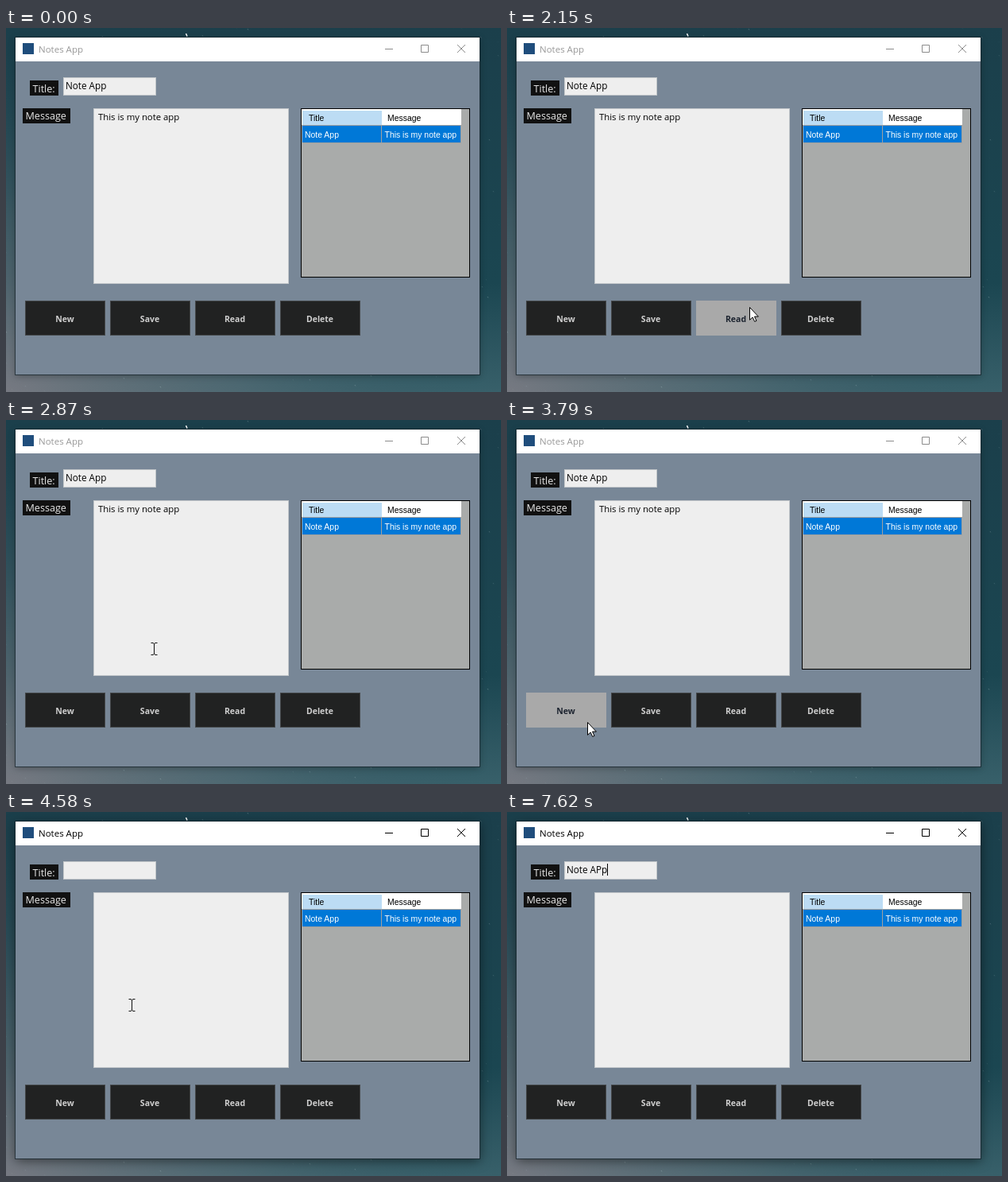
An HTML page that plays this animation: 623 px wide and 458 px high, repeating every 8000 ms.

```html
<!DOCTYPE html>
<html lang="en">
<head>
<meta charset="utf-8">
<title>Notes App</title>
<style>
html, body { margin: 0; width: 100%; height: 100%; overflow: hidden; background: #1b404c; }
svg { display: block; width: 100vw; height: 100vh; }
text { font-family: "Open Sans", "Noto Sans", sans-serif; font-size: 11.7px; white-space: pre; }
.label { font-size: 12.6px; fill: #e8e8e8; }
.field { fill: #eee; stroke: #c3c7ca; }
.grid text { font: 10.45px "Liberation Sans", Arial, sans-serif; }
.btn rect { fill: #212222; stroke: #444749; }
.btn text { font-size: 10.5px; font-weight: 700; fill: #cfcfcf; text-anchor: middle; }
.btn.hover rect { fill: #a9a9a9; stroke: #a9a9a9; }
.btn.hover text { fill: #1d2430; }
#frame { filter: drop-shadow(0 2px 4px rgba(0,0,0,.3)); }
.active #frame { filter: drop-shadow(0 3px 7px rgba(0,0,0,.5)); }
#caption { font-size: 11.5px; fill: #999; }
#message { font-size: 11.35px; }
#controls { fill: none; stroke: #8c8c8c; }
.active #caption { fill: #000; }
.active #controls { stroke: #000; }
</style>
</head>
<body>
<svg id="stage" viewBox="0 0 623 458">
  <defs>
    <linearGradient id="sky" x2="0" y2="1">
      <stop offset="0" stop-color="#1b3f4b"/>
      <stop offset=".7" stop-color="#1b4651"/>
      <stop offset="1" stop-color="#38606a"/>
    </linearGradient>
    <radialGradient id="haze" cx="0" cy="1" r=".95">
      <stop offset="0" stop-color="#7d7c84" stop-opacity=".9"/>
      <stop offset=".5" stop-color="#66727b" stop-opacity=".45"/>
      <stop offset="1" stop-color="#36545f" stop-opacity="0"/>
    </radialGradient>
  </defs>
  <rect width="623" height="458" fill="url(#sky)"/>
  <rect width="623" height="458" fill="url(#haze)"/>
  <g id="stars" stroke="#b9d0d4"></g>
  <path d="M226.5 7l1.5 3.5" stroke="#fff" stroke-width="1.5"/>

  <rect id="frame" x="12" y="12" width="584" height="424" fill="#788797"/>
  <rect x="11.5" y="11.5" width="585" height="425" fill="none" stroke="#14232a" stroke-opacity=".7"/>
  <rect x="12" y="12" width="584" height="30" fill="#fff"/>
  <rect x="21" y="19" width="14" height="14" fill="#1f4d7c"/>
  <text id="caption" x="41" y="31">Notes App</text>
  <path id="controls" d="M477 26.5h10M522.5 21.5h9v9h-9zM568 21l10 10M578 21l-10 10"/>

  <path d="M30 66h36v19H30zM21 101h60v19H21z" fill="#111"/>
  <text class="label" x="33.5" y="80.5">Title:</text>
  <text class="label" x="24.5" y="115">Message</text>
  <rect class="field" x="72.5" y="62.5" width="116" height="22"/>
  <rect class="field" x="110.5" y="101.5" width="245" height="220"/>
  <text id="title" x="75" y="77"></text>
  <text id="message" x="116" y="116"></text>
  <path id="caret" d="M.5 65v15" stroke="#000"/>

  <g class="grid">
    <rect x="371.5" y="101.5" width="212" height="212" fill="#a9abaa" stroke="#000"/>
    <rect x="372" y="102" width="201" height="20" fill="#fff"/>
    <rect x="373" y="104" width="100" height="18" fill="#bcdcf4"/>
    <rect x="373" y="123" width="199" height="21" fill="#0078d7"/>
    <path d="M373 122.5h200M472.5 123v21M572.5 123v21M373 144.5h200" stroke="#a0a0a0"/>
    <text x="381" y="117">Title</text>
    <text x="480" y="117">Message</text>
    <text x="376" y="138" fill="#fff">Note App</text>
    <text x="476.5" y="138" fill="#fff">This is my note app</text>
  </g>
  <g id="buttons"></g>

  <path id="arrow" d="M.5 .5V16.3L4.1 12.9L6.7 18.4L9 17.4L6.5 12.1H11.4Z" fill="#fff" stroke="#000"/>
  <path id="beam" d="M-3.5-7.5H-1L.5-6.5L2-7.5H4.5M.5-6.5V6.5M-3.5 7.5H-1L.5 6.5L2 7.5H4.5" fill="none" stroke="#111"/>
</svg>
<script>
const LOOP = 8000, ENTER = 440, STEP = 65.7;
const CLICK = 4190, CLEAR = 4250, FOCUS = 5040, BLINK = 530;
const TYPED = "Note APp", TYPE = 6760, KEY = 122.8;
const $ = id => document.getElementById(id);

// pointer turning points: time, x, y
const path = [
  [ENTER, 182, 418], [700, 198, 410], [970, 198, 410], [1230, 198, 368],
  [1290, 190, 362], [1690, 190, 362], [1820, 214, 395], [2150, 305, 351],
  [2610, 346, 131], [2870, 186, 288], [3130, 128, 377], [3340, 101, 332],
  [3790, 101, 380], [CLEAR, 101, 380], [4320, 142, 266], [4520, 142, 266],
  [4840, 227, 140], [5180, 92, 75]
];

$("buttons").innerHTML = ["New", "Save", "Read", "Delete"].map((name, i) => `<g class="btn">
  <rect x="${24.5 + i * 107}" y="343.5" width="100" height="43"/>
  <text x="${74 + i * 107}" y="370">${name}</text></g>`).join("");
const buttons = [...document.querySelectorAll(".btn")];

let seed = 7;
const rand = () => (seed = seed * 16807 % 2147483647) / 2147483647;
$("stars").innerHTML = Array.from({ length: 250 }, () =>
  `<path d="M${rand() * 623 | 0} ${rand() * 458 | 0}l.8 1.4" opacity="${rand() * .35}"/>`).join("");

const inside = ([x, y], l, t, r, b) => x >= l && x < r && y >= t && y < b;
const show = (el, on) => el.setAttribute("visibility", on ? "visible" : "hidden");

function pointer(t) {
  const s = ENTER + Math.max(0, Math.floor((t - ENTER) / STEP + .1)) * STEP;
  const i = path.findIndex(p => p[0] > s);
  if (i < 0) return path.at(-1).slice(1);
  const [t0, x0, y0] = path[i - 1], [t1, x1, y1] = path[i];
  const k = (s - t0) / (t1 - t0);
  return [Math.round(x0 + (x1 - x0) * k), Math.round(y0 + (y1 - y0) * k)];
}

function draw(t) {
  const pos = pointer(t), typing = t >= TYPE;
  const visible = t >= ENTER && !typing;
  const overText = inside(pos, 110, 101, 356, 322) || inside(pos, 72, 62, 189, 85);

  $("stage").classList.toggle("active", t >= CLICK);
  const count = Math.max(0, Math.floor((t - TYPE) / KEY) + 1);
  $("title").textContent = t < CLEAR ? "Note App" : TYPED.slice(0, count);
  $("message").textContent = t < CLEAR ? "This is my note app" : "";
  buttons.forEach((b, i) => b.classList.toggle("hover",
    visible && inside(pos, 24 + i * 107, 343, 125 + i * 107, 387)));

  show($("caret"), typing || t >= FOCUS && Math.floor((t - FOCUS) / BLINK) % 2 === 0);
  const width = typing ? $("title").getComputedTextLength() : 0;
  $("caret").setAttribute("transform", `translate(${Math.round(75 + width)})`);

  for (const [id, on] of [["arrow", !overText], ["beam", overText]]) {
    show($(id), visible && on);
    $(id).setAttribute("transform", `translate(${pos})`);
  }
}

function tick(now) {
  draw(now % LOOP);
  requestAnimationFrame(tick);
}
draw(0);
requestAnimationFrame(tick);
</script>
</body>
</html>
```
